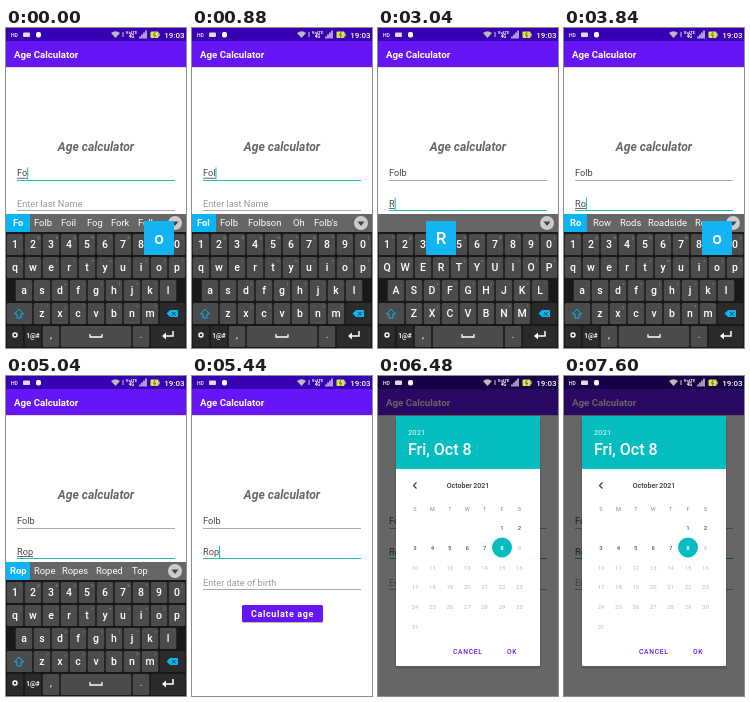
An HTML page that plays this animation: 180x320 px, repeating every 8000 ms.

```html
<!DOCTYPE html>
<html lang="en">
<head>
<meta charset="utf-8">
<title>Age Calculator</title>
<style>
html, body { margin: 0; width: 100%; height: 100%; overflow: hidden; background: #fff; }
svg { display: block; width: 100%; height: 100%; font-family: Roboto, sans-serif; }
</style>
</head>
<body>
<svg id="stage" viewBox="0 0 180 320"></svg>
<script>
const LOOP = 8000;
const TEAL = '#03bdbf', PURPLE = '#6515f6', BLUE = '#08b4f4';
const KEY = '#4b4b4b', DARK_KEY = '#2b2b2b';
const stage = document.getElementById('stage');

function add(parent, tag, attrs, text) {
  const node = document.createElementNS('http://www.w3.org/2000/svg', tag);
  for (const name in attrs) node.setAttribute(name, attrs[name]);
  if (text !== undefined) node.textContent = text;
  return parent.appendChild(node);
}
const group = parent => add(parent, 'g', {});
const rect = (parent, x, y, width, height, fill, rx = 0) =>
  add(parent, 'rect', { x, y, width, height, fill, rx });
const label = (parent, x, y, size, fill, text, extra = {}) =>
  add(parent, 'text', { x, y, 'font-size': size, fill, ...extra }, text);
const path = (parent, d, stroke, width = 1, fill = 'none') =>
  add(parent, 'path', { d, stroke, 'stroke-width': width, fill });
const MID = { 'text-anchor': 'middle' };
const show = (node, on) => node.setAttribute('display', on ? 'inline' : 'none');
const ramp = (t, from, to) => Math.min(1, Math.max(0, (t - from) / (to - from)));

// App screen
rect(stage, 0, 0, 180, 320, '#fff');
rect(stage, 0, 39, 180, 1, '#ddd');
rect(stage, 0, 13, 180, 26, PURPLE);
rect(stage, 0, 0, 180, 13, '#3700b3');
label(stage, 8, 29.5, 9.7, '#fff', 'Age Calculator', { 'font-weight': 700 });
label(stage, 90, 123, 12.1, '#666', 'Age calculator',
  { ...MID, 'font-weight': 700, 'font-style': 'italic' });

function makeField(baseline, hint) {
  const line = rect(stage, 11, Math.round(baseline + 3.5), 158, 1, '#aaa');
  const text = label(stage, 11, baseline, 9.2, '#999', hint);
  const composing = rect(stage, 11, baseline + 1.4, 0, 0.8, '#444');
  const cursor = rect(stage, 11, baseline - 9, 1, 12, TEAL);
  return (value, focused, typing, cursorOn) => {
    text.textContent = value || hint;
    text.setAttribute('fill', value ? '#444' : '#999');
    const width = value ? text.getComputedTextLength() : 0;
    line.setAttribute('fill', focused ? '#28b9b5' : '#aaa');
    composing.setAttribute('width', focused && typing ? width : 0);
    cursor.setAttribute('x', 11 + width);
    show(cursor, focused && cursorOn);
  };
}
const firstField = makeField(148.4, 'Enter first Name');
const lastField = makeField(178.8, 'Enter last Name');
makeField(209.5, 'Enter date of birth')('', false, false, false);
rect(stage, 50, 229.5, 81, 17.5, '#bbb', 1.5);
rect(stage, 50, 229, 81, 17, PURPLE, 1.5);
label(stage, 90.5, 241, 9, '#fff', 'Calculate age',
  { ...MID, 'font-weight': 700, 'letter-spacing': 0.6 });

// Keyboard
const keyboard = group(stage);
rect(keyboard, 0, 186, 180, 134, '#181818');
rect(keyboard, 0, 186, 180, 18, '#666');
const bar = group(keyboard);
add(keyboard, 'circle', { cx: 169, cy: 195, r: 7, fill: '#ccc' });
path(keyboard, 'M165.5 193.5h7l-3.5 4.5z', 'none', 0, '#444');

const keys = {};
const letters = [];
const rowTop = row => 206 + row * 23;
const keyBox = (x, row, width, fill) =>
  rect(keyboard, x + 0.7, rowTop(row), width - 1.4, 21, fill, 1.5);

[['1234567890', '!@#$%^&*()', 0], ['qwertyuiop', '~`|•√π÷×{}', 0],
 ['asdfghjkl', '_-+=[]<>"', 9], ['zxcvbnm', '°¢/:;?!', 27]].forEach(([chars, marks, left], row) => {
  [...chars].forEach((char, i) => {
    const x = left + i * 18;
    keyBox(x, row, 18, KEY);
    const node = label(keyboard, x + 9, rowTop(row) + 14, 10.5, '#fff', char,
      { ...MID, 'font-weight': 500 });
    label(keyboard, x + 14.5, rowTop(row) + 5, 4, '#999', marks[i], MID);
    keys[char] = { x: x + 9, top: rowTop(row) };
    if (row) letters.push([node, char]);
  });
});
keyBox(0, 3, 27, KEY);
path(keyboard, 'M13 281l-4.5 5h2.5v4h4v-4h2.5z', BLUE);
keyBox(153, 3, 27, DARK_KEY);
path(keyboard, 'M160.5 285.5l3.5-3.5h8v7h-8z', 'none', 0, BLUE);
path(keyboard, 'M166 284l3.5 3.5M169.5 284l-3.5 3.5', '#222', 0.9);
[[0, 18, DARK_KEY], [18, 18, DARK_KEY], [36, 18, KEY], [54, 72, KEY], [126, 18, KEY],
 [144, 36, DARK_KEY]].forEach(([x, width, fill]) => keyBox(x, 4, width, fill));
add(keyboard, 'circle', { cx: 9, cy: 307, r: 2, fill: 'none', stroke: '#fff',
  'stroke-width': 1.4 });
label(keyboard, 27, 310, 6.5, '#fff', '1@#', { ...MID, 'font-weight': 700 });
label(keyboard, 45, 310, 10, '#fff', ',', MID);
label(keyboard, 135, 310, 10, '#fff', '.', MID);
path(keyboard, 'M84 306v3h12v-3', '#fff', 1.3);
path(keyboard, 'M167 303v5h-9', '#fff', 1.5);
path(keyboard, 'M160 304.5l-4 3.5 4 3.5z', 'none', 0, '#fff');

const popup = group(keyboard);
rect(popup, -15, -36, 30, 34, '#14b4f4', 1);
const popupText = label(popup, 0, -13.5, 17, '#fff', '', { ...MID, 'font-weight': 500 });

// Words with their left edges; the first one sits in the blue box.
const suggestions = {
  none: [0, []],
  fo: [24, [['Fo', 7], ['Folb', 28], ['Foil', 55], ['Fog', 81], ['Fork', 105], ['Folk', 132]]],
  fol: [24, [['Fol', 5], ['Folb', 28], ['Folbson', 56], ['Oh', 101], ["Folb's", 122]]],
  folb: [27, [['Folb', 4], ['Folbson', 32], ["Folb's", 75], ['Folbey', 108], ['Fo', 145]]],
  r: [23, [['R', 8], ['Really', 28], ['Right', 62], ['Ready', 94], ['Run', 131]]],
  ro: [23, [['Ro', 6], ['Row', 29], ['Rods', 56], ['Roadside', 84], ['Room', 131]]],
  rop: [24, [['Rop', 4], ['Rope', 28], ['Ropes', 56], ['Roped', 90], ['Top', 126]]]
};
let barName;
function drawBar(name) {
  if (name === barName) return;
  barName = name;
  bar.replaceChildren();
  const [width, words] = suggestions[name];
  rect(bar, 0, 186, width, 18, BLUE);
  words.forEach(([word, x], i) =>
    label(bar, x, 198.3, 9.4, '#fff', word, { 'font-weight': i ? 400 : 700 }));
}

// Date dialog
const scrim = rect(stage, 0, 0, 180, 320, '#000');
const dialog = group(stage);
rect(dialog, 17, 41, 146, 252, 'rgba(0,0,0,.1)', 2);
rect(dialog, 18, 40, 144, 250, '#fff', 1);
rect(dialog, 18, 40, 144, 53, TEAL, 1);
label(dialog, 30, 59, 7.6, 'rgba(255,255,255,.75)', '2021', { 'font-weight': 500 });
label(dialog, 30, 79, 16, '#fff', 'Fri, Oct 8', { 'font-weight': 500 });
label(dialog, 75, 278, 6.7, PURPLE, 'CANCEL', { 'font-weight': 500, 'letter-spacing': 0.7 });
label(dialog, 129, 278, 6.7, PURPLE, 'OK', { 'font-weight': 500, 'letter-spacing': 0.7 });

const calendar = group(dialog);
path(calendar, 'M38.5 106.5l-3 3 3 3', '#333', 1.1);
label(calendar, 90, 112, 7, '#333', 'October 2021', { ...MID, 'font-weight': 500 });
const columnX = i => 37 + i * 17.4;
[...'SMTWTFS'].forEach((day, i) => label(calendar, columnX(i), 134.5, 5.6, '#888', day, MID));
add(calendar, 'circle', { cx: columnX(5), cy: 171.5, r: 10, fill: TEAL });
for (let day = 1; day <= 31; day++) {
  const cell = day + 4, chosen = day === 8;
  label(calendar, columnX(cell % 7), 153.7 + Math.floor(cell / 7) * 19.9, 6,
    chosen ? '#fff' : day < 8 ? '#333' : '#bbb', day,
    { ...MID, 'font-weight': chosen ? 700 : 400 });
}

// Status bar
label(stage, 5, 9, 5, '#fff', 'HD', { 'font-weight': 500 });
rect(stage, 17, 4.5, 7, 4.5, '#ddd', 1);
rect(stage, 30, 4, 5, 5.5, '#fff', 2);
path(stage, 'M105 5q4.5-3.5 9 0l-4.5 5z', 'none', 0, '#bbb');
path(stage, 'M117 4v5', '#ccc', 1);
label(stage, 125.5, 6.3, 4, '#fff', 'VoLTE', { ...MID, 'font-weight': 700 });
label(stage, 125.5, 10.3, 4.5, '#fff', '4G', { ...MID, 'font-weight': 700 });
path(stage, 'M134 10.5v-2M136 10.5v-4M138 10.5v-6M140 10.5v-8', '#fff', 1.2);
rect(stage, 144.5, 3.5, 8, 6.5, '#d6e94a', 1);
rect(stage, 152.5, 5.3, 1, 3, '#fff');
path(stage, 'M149 4.2l-1.5 3h2l-1 2.5', '#333', 0.7);
label(stage, 178.5, 10, 8, '#fff', '19:03', { 'text-anchor': 'end', 'font-weight': 500 });

// Each step lists only what changes.
const steps = [
  [0, { first: 'Fo', last: '', focus: 1, press: 'o', caps: false, words: 'fo', cursor: true }],
  [240, { press: '' }],
  [480, { press: 'l' }],
  [560, { first: 'Fol' }],
  [640, { words: 'fol' }],
  [880, { press: '' }],
  [1200, { press: 'b' }],
  [1280, { first: 'Folb' }],
  [1360, { words: 'folb' }],
  [1680, { press: '' }],
  [2000, { focus: 2 }],
  [2240, { words: 'none', caps: true }],
  [2720, { cursor: false }],
  [2960, { press: 'r', cursor: true }],
  [3040, { last: 'R' }],
  [3120, { words: 'r', caps: false }],
  [3520, { press: '' }],
  [3680, { press: 'o' }],
  [3760, { last: 'Ro' }],
  [3840, { words: 'ro' }],
  [4080, { press: '' }],
  [4240, { press: 'p' }],
  [4320, { last: 'Rop' }],
  [4400, { words: 'rop' }],
  [4720, { press: '' }],
  [5040, { cursor: false }],
  [5200, { cursor: true }],
  [5840, { cursor: false }]
];

function render(t) {
  const state = Object.assign({}, ...steps.filter(([at]) => at <= t).map(([, change]) => change));
  const typing = t < 5200;
  firstField(state.first, state.focus === 1, typing, state.cursor);
  lastField(state.last, state.focus === 2, typing, state.cursor);

  const hide = ramp(t, 5200, 5440);
  show(keyboard, hide < 1);
  keyboard.setAttribute('transform', `translate(0 ${134 * hide})`);
  drawBar(state.words);
  const cased = char => state.caps ? char.toUpperCase() : char;
  letters.forEach(([node, char]) => { node.textContent = cased(char); });
  show(popup, state.press);
  if (state.press) {
    const key = keys[state.press];
    popup.setAttribute('transform', `translate(${key.x} ${key.top})`);
    popupText.textContent = cased(state.press);
  }

  dialog.setAttribute('opacity', ramp(t, 6080, 6480) ** 2);
  calendar.setAttribute('opacity', ramp(t, 6320, 6480));
  scrim.setAttribute('opacity', 0.6 * ramp(t, 6320, 6480));
}

const start = performance.now();
function tick() {
  render((performance.now() - start) % LOOP);
  requestAnimationFrame(tick);
}
tick();
</script>
</body>
</html>
```
